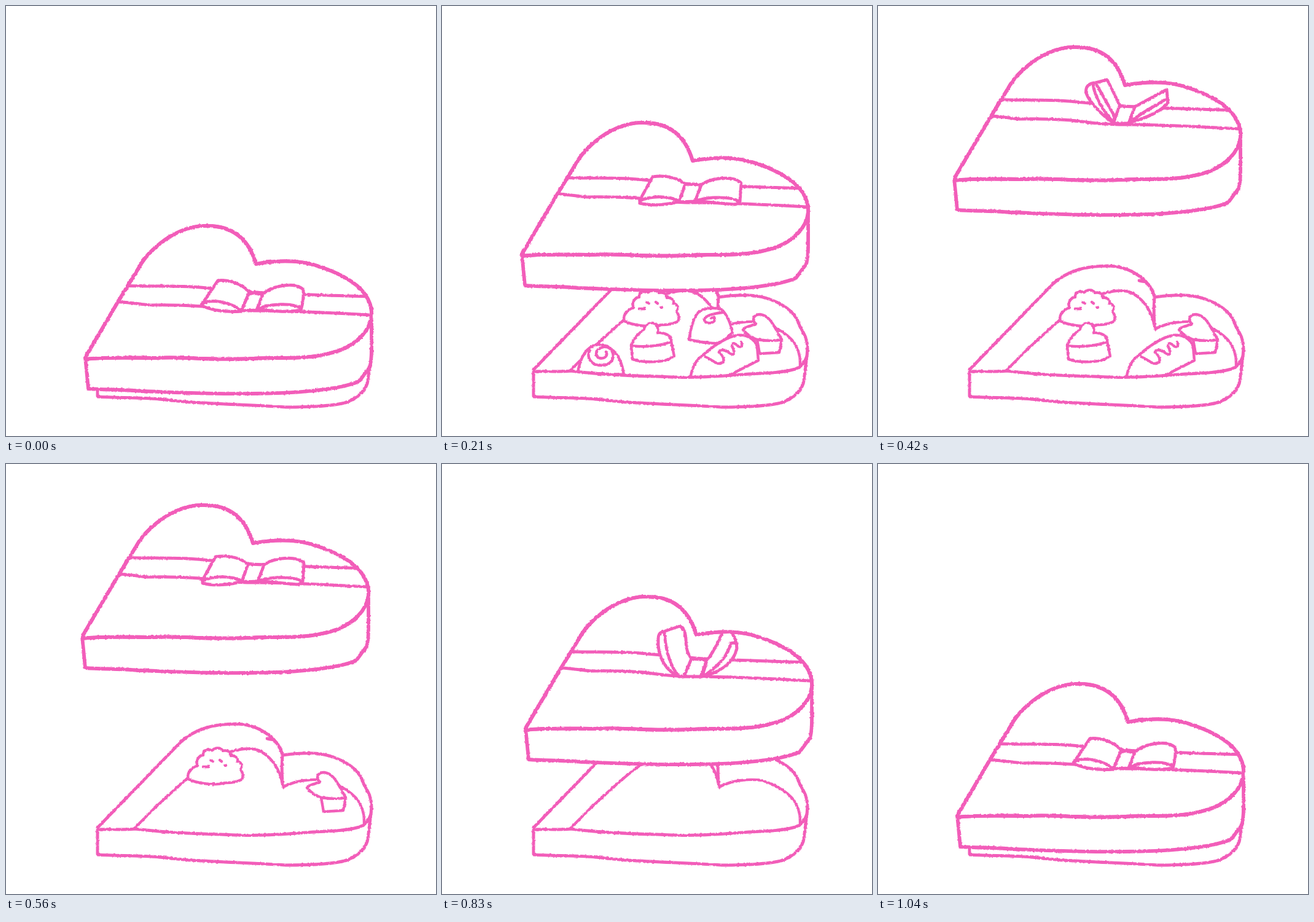
Write an HTML page that moves like this. It is 700 by 700 pixels and loops after 1170 ms.

```html
<!DOCTYPE html>
<html lang="en">
<head>
<meta charset="utf-8">
<title>Chocolate box</title>
<style>
  html, body { margin: 0; width: 100%; height: 100%; overflow: hidden; background: #fff; }
  svg { display: block; width: 100vw; height: 100vh; }
  path { fill: #fff; stroke: #f25db9; stroke-linecap: round; stroke-linejoin: round; }
  .line { fill: none; }
  .thick path, #heart { stroke-width: 5.8; }
  .medium path { stroke-width: 5; }
  .thin path { stroke-width: 4.4; }
</style>
</head>
<body>
<svg viewBox="0 0 700 700">
  <defs>
    <filter id="crayon" filterUnits="userSpaceOnUse" x="0" y="0" width="700" height="700" color-interpolation-filters="sRGB">
      <feTurbulence type="fractalNoise" baseFrequency=".25" numOctaves="2" seed="4" result="grain"/>
      <feDisplacementMap in="SourceGraphic" in2="grain" scale="3" xChannelSelector="R" yChannelSelector="G"/>
      <feGaussianBlur stdDeviation=".6"/>
    </filter>
    <path id="heart" d="M129 572L182 482L215 428C222 415 230 405 240 396C265 372 297 357 328 358C372 358 396 382 407 420C440 414 470 413 500 421C535 431 570 448 585 470C593 482 596 495 595 505C592 530 570 550 545 560C505 574 470 573 430 573C390 574 360 576 320 574C290 573 270 571 245 573C210 573 160 571 130 575"/>
    <clipPath id="top"><use href="#heart"/></clipPath>
  </defs>

  <g filter="url(#crayon)">
    <g class="medium">
      <path d="M149 592L285 452C310 430 340 423 375 423C415 424 445 450 450 474C480 470 510 468 535 478C560 487 577 502 582 520C588 532 595 540 595 558L594 570"/>
      <path class="line" d="M450 474C449 490 448 505 451 526M425 447L436 449"/>
    </g>
    <g class="thin">
      <path class="line" d="M208 594L245 557C275 530 300 505 335 482C370 462 400 460 415 468C440 483 448 505 451 526C470 515 500 512 520 515C545 522 570 538 577 555C583 567 583 575 583 587"/>
      <g id="cluster">
        <path d="M297 513C293 503 303 494 312 491C308 484 314 474 321 474C320 466 330 462 335 467C340 461 350 461 353 467C360 465 367 470 366 475C372 474 378 478 377 484C384 486 386 492 382 497C387 505 386 512 383 514C375 518 365 519 357 519C340 524 310 520 297 513Z"/>
        <path class="line" d="M321 493h9M333 482l4 2M348 482l3 2M357 491h1"/>
      </g>
      <g id="sweetheart">
        <path d="M308 553L310 575C325 581 355 580 367 576L378 570L373 546Z"/>
        <path d="M308 552C312 540 322 532 329 526C330 518 340 514 346 517C352 521 352 526 351 532C362 531 375 537 373 546C360 553 330 556 308 553Z"/>
      </g>
      <g id="cup">
        <path d="M402 543C405 525 410 505 418 498C430 490 445 491 455 494C465 503 470 518 473 531C465 540 460 545 452 549C435 550 415 546 402 543Z"/>
        <path class="line" d="M456 499C447 500 430 503 427 510C427 517 438 518 443 513C446 508 443 506 438 508"/>
      </g>
      <g id="wedge">
        <path d="M513 543L517 566L549 564L553 543Z"/>
        <path d="M490 527C497 520 505 521 511 518C502 508 510 502 518 502C530 504 535 512 540 520L553 543C540 546 526 545 513 543Q500 539 490 527Z"/>
      </g>
      <g id="log">
        <path d="M405 602C408 585 415 575 425 568C440 555 460 540 480 536C495 534 510 542 513 555L515 577C500 585 485 592 470 600"/>
        <path class="line" d="M428 571C440 575 445 583 452 582C464 580 457 568 450 563C453 558 463 560 468 565C474 569 478 567 474 558C470 550 474 546 480 552C486 558 490 553 487 547"/>
      </g>
      <g id="truffle">
        <path d="M221 597C224 578 232 556 252 551C275 550 292 568 296 600Z"/>
        <path class="line" d="M241 560C234 572 243 585 259 585C274 585 281 575 278 565C275 556 267 553 260 556C250 559 248 570 256 573C264 575 271 570 267 563"/>
      </g>
    </g>
    <g class="medium">
      <path d="M149 595C170 594 190 596 210 594C250 599 300 602 350 603C400 606 440 604 500 599C525 598 555 597 575 591Q589 586 594 570L589 610C588 622 575 637 555 645C535 651 500 653 455 653C410 650 370 649 320 646C290 645 280 643 250 640C220 637 180 638 149 636Z"/>
    </g>

    <g id="lid">
      <g class="thick">
        <path d="M129 572L134 623C160 625 190 624 220 627C280 629 340 632 400 631C460 631 540 626 575 611L592 588C596 575 595 560 595 505"/>
      </g>
      <use href="#heart"/>
      <g clip-path="url(#top)">
        <g id="ribbon" class="medium">
          <path class="line" d="M180 455C230 457 270 455 300 457C350 460 390 466 440 468C500 470 540 472 600 473M170 481C200 482 215 485 235 487C270 486 290 487 320 489C350 493 370 496 410 496C470 496 540 500 610 504"/>
        </g>
      </g>
      <use href="#heart" fill-opacity="0"/>
      <g id="bow" class="medium">
        <g id="rest">
          <path d="M345 447C360 445 385 452 396 466L383 497C360 499 330 495 318 487Z"/>
          <path class="line" d="M318 486C330 476 365 480 383 497"/>
          <path d="M396 467L418 469L409 495L383 496Z"/>
          <path d="M418 469C430 458 455 452 470 455Q484 459 484 463C485 475 483 485 480 495C460 499 430 497 409 493Z"/>
          <path class="line" d="M409 493C430 485 465 482 480 492"/>
        </g>
        <g id="flat" transform="translate(5 280)">
          <path d="M337 174C355 171 375 174 390 186L380 214C360 220 335 222 316 217L316 212Z"/>
          <path class="line" d="M316 213C335 204 365 205 380 214"/>
          <path d="M416 187C430 177 455 174 470 178Q482 182 481 186L479 214Q474 219 470 219C445 217 425 215 406 213Z"/>
          <path class="line" d="M408 213C430 206 465 206 478 214"/>
          <path d="M390 186L416 187L406 214L380 215Z"/>
        </g>
        <g id="steep" transform="translate(5 303)">
          <path d="M354 125L373 120L394 162L383 190C365 178 345 158 339 142C337 132 343 125 354 125Z"/>
          <path class="line" d="M350 127C352 145 365 170 383 189M354 125L386 181"/>
          <path d="M418 164L470 136L472 158C460 172 435 183 408 190Z"/>
          <path class="line" d="M468 152C450 164 430 172 412 188"/>
          <path d="M393 163L418 164L408 191L383 191Z"/>
        </g>
        <g id="lifted" transform="translate(-7 150)">
          <path d="M357 274L387 264Q396 268 397 285C397 300 400 311 407 317L394 346L386 346C366 338 350 315 352 285Q352 276 357 274Z"/>
          <path class="line" d="M362 275C364 300 370 328 386 346"/>
          <path d="M431 319C445 305 450 285 457 274L470 273Q480 285 480 300C475 325 450 340 424 346Z"/>
          <path class="line" d="M480 293Q475 290 470 292C465 310 455 325 428 344"/>
          <path d="M406 317L431 319L421 346L394 346Z"/>
        </g>
      </g>
    </g>
  </g>
</svg>
<script>
  const LOOP = 1170;
  const BOWS = ['rest', 'flat', 'steep', 'lifted'];
  const SWEETS = ['truffle', 'cup', 'sweetheart', 'log', 'cluster', 'wedge'];

  // start ms, lid x, lid y, ribbon y, bow, bow x, sweets eaten
  const STEPS = [
    [0, 0, 0, 0, 'rest', 0, 0],
    [70, 3, -18, -4, 'rest', 0, 0],
    [140, 6, -58, -7, 'rest', 0, 0],
    [210, 1, -168, -8, 'flat', 0, 0],
    [280, -5, -272, -8, 'flat', 0, 0],
    [350, -5, -291, -12, 'lifted', 0, 1],
    [420, -5, -291, -12, 'steep', 0, 2],
    [490, -5, -291, -12, 'lifted', 0, 3],
    [560, -5, -291, -12, 'flat', 4, 4],
    [630, -5, -291, -12, 'flat', 4, 5],
    [690, -5, -291, -12, 'flat', 4, 6],
    [760, 1, -232, -10, 'lifted', 0, 6],
    [830, 7, -142, -8, 'lifted', 0, 6],
    [900, 7, -66, -7, 'rest', 0, 6],
    [970, 3, -18, -4, 'rest', 0, 6],
    [1040, 0, 0, 0, 'rest', 0, 6]
  ];

  const part = id => document.getElementById(id);
  const move = (id, x, y) => part(id).setAttribute('transform', `translate(${x} ${y})`);
  const show = (id, on) => { part(id).style.display = on ? '' : 'none'; };

  let shown = null;
  function draw(step) {
    const [, x, y, ribbonY, bow, bowX, eaten] = step;
    move('lid', x, y);
    move('ribbon', 0, ribbonY);
    move('bow', bowX, ribbonY);
    BOWS.forEach(id => show(id, id === bow));
    SWEETS.forEach((id, i) => show(id, i >= eaten));
    shown = step;
  }

  const start = performance.now();
  function tick() {
    const t = (performance.now() - start) % LOOP;
    const step = STEPS.findLast(s => s[0] <= t) || STEPS[0];
    if (step !== shown) draw(step);
    requestAnimationFrame(tick);
  }
  tick();
</script>
</body>
</html>
```
